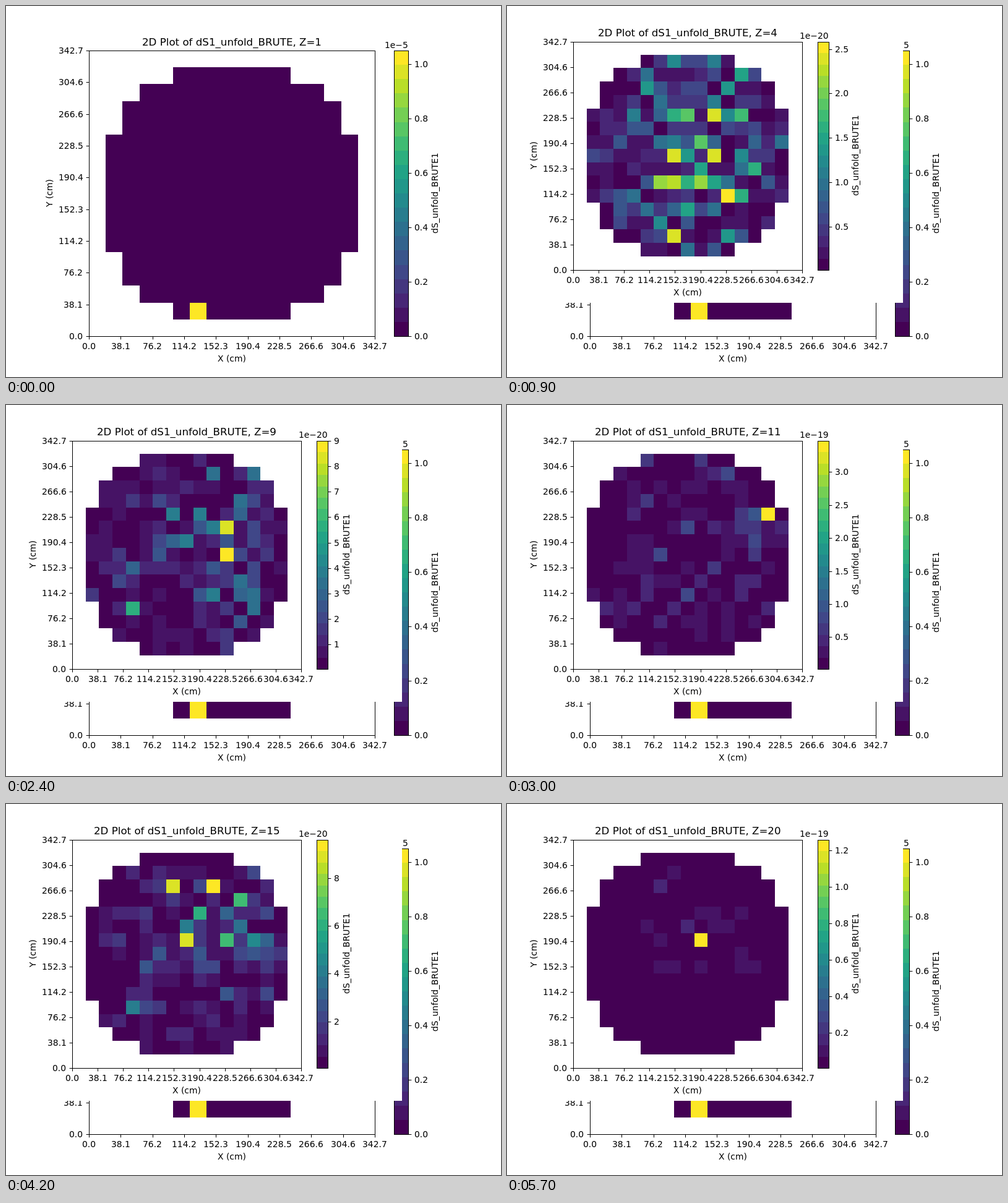
An HTML page with a canvas that plays this animation: 800 by 600 pixels, repeating every 6 s.

```html
<!DOCTYPE html>
<html lang="en">
<head>
<meta charset="utf-8">
<title>Layer plots</title>
<style>
  html, body { margin: 0; width: 100%; height: 100%; overflow: hidden; background: #fff; }
  canvas { display: block; }
</style>
</head>
<body>
<canvas id="stage" width="800" height="600"></canvas>
<script>
const ctx = document.getElementById('stage').getContext('2d');
const STEP_MS = 300, LAYERS = 20, CELLS = 17, BANDS = 20, TICK = 4.86;

// Key layers; the ones between are interpolated.
const keys = [
  { z: 1, max: 1.05e-5, col: 6, row: 15 },
  { z: 2, max: 2.1e-20, col: 10, row: 8 },
  { z: 4, max: 2.583e-20, col: 11, row: 11 },
  { z: 5, max: 4.8e-20, col: 9, row: 9 },
  { z: 7, max: 7.4e-20, col: 8, row: 11 },
  { z: 9, max: 9e-20, col: 11, row: 8 },
  { z: 11, max: 3.475e-19, col: 14, row: 5 },
  { z: 15, max: 9.62e-20, col: 10, row: 3 },
  { z: 17, max: 6.34e-20, col: 7, row: 7 },
  { z: 18, max: 1.1e-19, col: 8, row: 7 },
  { z: 20, max: 1.26e-19, col: 9, row: 7 }
];

function layerAt(z) {
  const next = keys.findIndex(key => key.z >= z);
  const b = keys[next], a = keys[Math.max(0, next - 1)];
  const t = b.z === z ? 1 : (z - a.z) / (b.z - a.z);
  const max = a.max ** (1 - t) * b.max ** t;
  const fade = 1 - 0.8 * (z / LAYERS) ** 16;
  return {
    z, max,
    col: Math.round(a.col + (b.col - a.col) * t),
    row: Math.round(a.row + (b.row - a.row) * t),
    // A higher peak leaves the other cells darker.
    spread: 24 * fade / Math.sqrt(max / 1e-20)
  };
}

const viridis = ['440154', '482475', '414487', '355f8d', '2a788e', '21918c',
                 '22a884', '44bf70', '7ad151', 'bddf26', 'fde725']
  .map(hex => [0, 2, 4].map(i => parseInt(hex.slice(i, i + 2), 16)));

function bandColor(band) {
  const p = band / (BANDS - 1) * (viridis.length - 1);
  const i = Math.min(Math.floor(p), viridis.length - 2);
  const rgb = viridis[i].map((v, k) => Math.round(v + (viridis[i + 1][k] - v) * (p - i)));
  return `rgb(${rgb})`;
}

const noise = seed => {
  const v = Math.sin(seed * 12.9898) * 43758.5453;
  return v - Math.floor(v);
};

const snap = v => Math.round(v) + 0.5;

function fillBox(x0, y0, x1, y1, color) {
  const left = Math.round(x0), top = Math.round(y0);
  ctx.fillStyle = color;
  ctx.fillRect(left, top, Math.round(x1) - left, Math.round(y1) - top);
}

function line(x0, y0, x1, y1) {
  ctx.beginPath();
  ctx.moveTo(x0, y0);
  ctx.lineTo(x1, y1);
  ctx.stroke();
}

function frameBox(x0, y0, x1, y1) {
  ctx.strokeRect(snap(x0), snap(y0), snap(x1) - snap(x0), snap(y1) - snap(y0));
}

// Text starts on whole pixels; anchor is 0 for left, 0.5 for centre, 1 for right.
function text(str, x, y, anchor = 0.5, size = 13.89) {
  ctx.font = `${size}px "DejaVu Sans", sans-serif`;
  ctx.fillStyle = '#000';
  ctx.fillText(str, Math.round(x - ctx.measureText(str).width * anchor), Math.round(y));
}

function sideText(str, x, y) {
  ctx.save();
  ctx.translate(Math.round(x), Math.round(y));
  ctx.rotate(-Math.PI / 2);
  text(str, 0, 0);
  ctx.restore();
}

// Half width of the stepped disc at a distance from its middle row.
const halfWidth = d => d > 7 ? -1 : d === 7 ? 3 : d === 6 ? 5 : d > 3 ? 6 : 7;

function cellBand(layer, col, row) {
  if (col === layer.col && row === layer.row) return BANDS - 1;
  const d2 = ((col - 9.3) ** 2 + (row - 7.5) ** 2) / 64;
  const roll = -Math.log(1 - noise(layer.z * 91.7 + col * 37.31 + row * 13.97));
  const level = 0.48 * layer.spread * roll * Math.exp(-1.2 * d2);
  return Math.min(BANDS - 2, Math.floor(level));
}

function drawCells(layer, x0, y0, cell) {
  for (let row = 0; row < CELLS; row++) {
    const half = halfWidth(Math.abs(row - 8));
    for (let col = 8 - half; col <= 8 + half; col++) {
      const x = x0 + col * cell, y = y0 + row * cell;
      fillBox(x, y, x + cell, y + cell, bandColor(cellBand(layer, col, row)));
    }
  }
}

function drawColorbar(layer, scale, top, bottom) {
  const exponent = Math.floor(Math.log10(layer.max));
  const max = layer.max / 10 ** exponent;
  const min = layer.z === 1 ? 0 : max * 0.004;
  const left = 627 * scale, right = left + 23.1 * scale;
  const height = bottom - top;
  for (let i = 0; i < BANDS; i++) {
    fillBox(left, bottom - (i + 1) * height / BANDS, right, bottom - i * height / BANDS, bandColor(i));
  }
  frameBox(left, top, right, bottom);

  const step = [0.2, 0.25, 0.5, 1, 2].find(s => max / s <= 9.2);
  const decimals = step === 0.25 ? 2 : step < 1 ? 1 : 0;
  for (let i = min > 0 ? 1 : 0; i * step <= max; i++) {
    const y = bottom - (i * step - min) / (max - min) * height;
    line(snap(right), snap(y), snap(right) + TICK, snap(y));
    text((i * step).toFixed(decimals), right + 9.7, y + 5, 0);
  }
  const labelWidth = 8.84 * (1 + decimals) + (decimals ? 4.42 : 0);
  sideText('dS_unfold_BRUTE1', right + labelWidth + 25.8, (top + bottom) / 2);
  text(`1e\u2212${-exponent}`, right, top - 4.4, 1);
}

function drawFigure(z, scale) {
  const layer = layerAt(z);
  const left = 134 * scale, right = 596 * scale;
  const top = 72 * scale, bottom = 534 * scale, size = right - left;
  ctx.fillStyle = '#fff';
  ctx.fillRect(0, 0, 800 * scale, 600 * scale);
  ctx.strokeStyle = '#000';
  ctx.lineWidth = 1;

  drawCells(layer, Math.floor(left), Math.floor(top), size / CELLS);
  frameBox(left, top, right, bottom);
  for (let i = 0; i <= 9; i++) {
    const label = (i * 38.08).toFixed(1);
    const x = left + size * i / 9, y = bottom - size * i / 9;
    line(snap(x), snap(bottom), snap(x), snap(bottom) + TICK);
    line(snap(left) - TICK, snap(y), snap(left), snap(y));
    text(label, x, bottom + 20.8);
    text(label, left - 9.7, y + 5, 1);
  }
  text('X (cm)', (left + right) / 2, bottom + 40.8);
  sideText('Y (cm)', left - 59, (top + bottom) / 2);
  text(`2D Plot of dS1_unfold_BRUTE, Z=${z}`, (left + right) / 2, top - 8.3, 0.5, 16.67);
  drawColorbar(layer, scale, top, bottom);
}

let shown = 0;
function render(time) {
  const z = Math.floor(time / STEP_MS) % LAYERS + 1;
  if (z === shown) return;
  shown = z;
  drawFigure(1, 1);
  // Later layers come as a smaller figure laid over the first.
  if (z > 1) drawFigure(z, 0.8);
}

const start = performance.now();
function tick() {
  render(performance.now() - start);
  requestAnimationFrame(tick);
}
tick();
</script>
</body>
</html>
```
